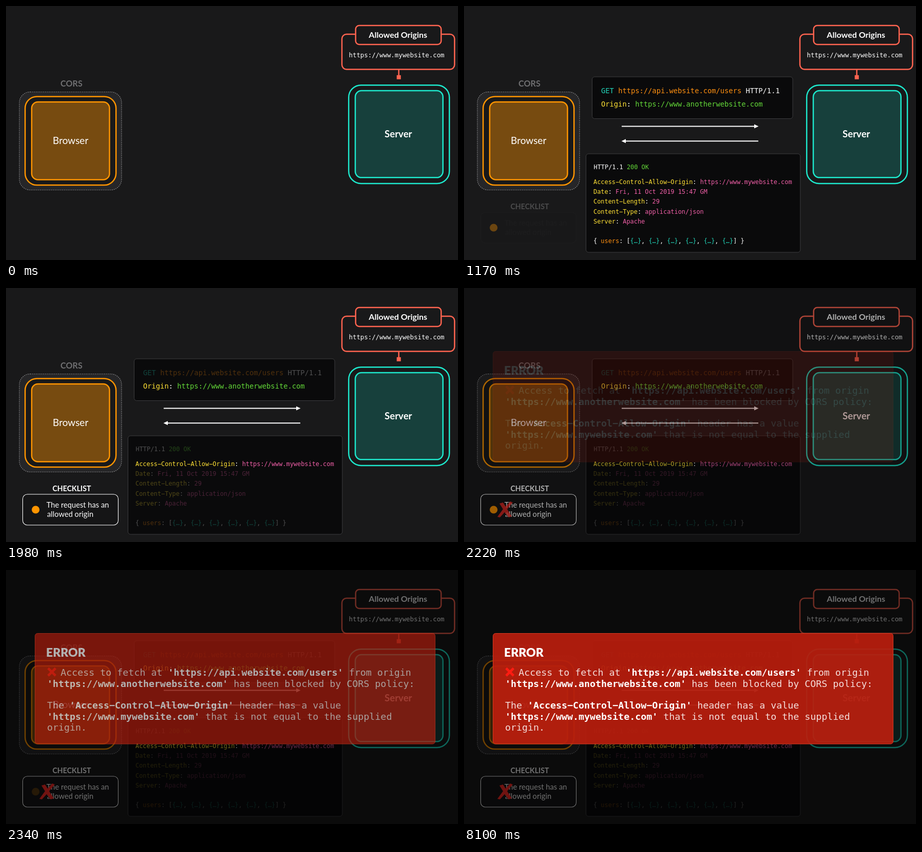
These frames come from a looping animation (880x495 px, 8130 ms). An HTML page:

```html
<!DOCTYPE html>
<html lang="en">
<head>
<meta charset="utf-8">
<title>CORS request blocked</title>
<style>
  html, body { margin: 0; width: 100%; height: 100%; overflow: hidden; background: #19191a; }
  svg { display: block; width: 100vw; height: 100vh; }
  text { white-space: pre; fill: #fff; font-family: Lato, "Open Sans", sans-serif; }
  .mono, .mono text { font-family: "DejaVu Sans Mono", "Noto Sans Mono", monospace; }
  .mid { text-anchor: middle; }
  .bold { font-weight: 700; }
  .card { fill: #0a0a0b; stroke: #3d3d3f; }
  .ring { fill: #19191a; stroke-width: 2.5; }
  .orange { stroke: #ff9500; }
  .teal { stroke: #1de9cd; }
  .coral { stroke: #ff6450; }
  .arrow { stroke: #fff; stroke-width: 2; }
  .t { fill: #22d3b8; }
  .o { fill: #ff9010; }
  .y { fill: #ffe135; }
  .g { fill: #63d838; }
  .p { fill: #ef5fa7; }
  #request text { font-size: 13.76px; }
  #response text { font-size: 11.9px; }
  #panel .mono text { font-size: 18.3px; fill: #f4dedb; }
  #panel .bold { fill: #fff; }
</style>
</head>
<body>
<svg viewBox="0 0 880 495" preserveAspectRatio="none">
  <rect width="880" height="495" fill="#19191a"/>

  <g id="browser">
    <text class="mid bold" x="127.5" y="156.5" font-size="16.2" style="fill:#6e6e70">CORS</text>
    <rect x="26" y="167.5" width="199" height="191" rx="21" fill="#262628" stroke="#858587" stroke-width="1.2" stroke-dasharray="2 1.6"/>
    <rect class="ring orange" x="37.2" y="176.5" width="177" height="172.5" rx="23"/>
    <rect class="ring orange" x="50" y="187" width="151.5" height="151.5" rx="12" style="fill:#774b10"/>
    <text class="mid" x="125.7" y="269" font-size="19">Browser</text>
  </g>

  <g id="server">
    <rect class="ring coral" x="654" y="55" width="219.3" height="68.5" rx="9"/>
    <rect class="ring coral" x="680.7" y="38" width="166.5" height="37" rx="7"/>
    <text class="mid bold" x="763.2" y="61.5" font-size="16">Allowed Origins</text>
    <text class="mono" x="667.5" y="100.3" font-size="12.36">https://www.mywebsite.com</text>
    <path class="coral" d="M764.7 123V137" stroke-width="2.5"/>
    <rect x="760.7" y="134.8" width="8" height="8" fill="#ff6450"/>
    <rect class="ring teal" x="667.2" y="154.2" width="196" height="191.8" rx="24"/>
    <rect class="ring teal" x="680" y="165" width="170.7" height="169.3" rx="12" style="fill:#17403c"/>
    <text class="mid bold" x="763.8" y="256" font-size="18.6">Server</text>
  </g>

  <g id="request" class="mono">
    <rect class="card" x="249.5" y="138" width="390.5" height="81.5" rx="5"/>
    <g class="fading">
      <text x="267" y="170.3"><tspan class="t">GET</tspan> <tspan class="o">https://api.website.com/users</tspan> HTTP/1.1</text>
    </g>
    <text x="267" y="196.3"><tspan class="y">Origin</tspan>: <tspan class="g">https://www.anotherwebsite.com</tspan></text>
    <path class="arrow" d="M307 234.5H567"/>
    <path d="M573.5 234.5l-8.5-4v8z" fill="#fff"/>
  </g>

  <g id="response" class="mono">
    <path class="arrow" d="M313 263.2H573"/>
    <path d="M306.5 263.2l8.5-4v8z" fill="#fff"/>
    <rect class="card" x="237.5" y="288" width="417.3" height="192" rx="5"/>
    <text x="252" y="346.8"><tspan class="y">Access−Control−Allow−Origin</tspan>: <tspan class="p">https://www.mywebsite.com</tspan></text>
    <g class="fading">
      <text x="252.5" y="318.3">HTTP/1.1 <tspan class="g">200 OK</tspan></text>
      <text x="252" y="365.8"><tspan class="y">Date</tspan>: <tspan class="p">Fri, 11 Oct 2019 15:47 GM</tspan></text>
      <text x="252" y="385"><tspan class="y">Content−Length</tspan>: <tspan class="p">29</tspan></text>
      <text x="252" y="404.5"><tspan class="y">Content−Type</tspan>: <tspan class="p">application/json</tspan></text>
      <text x="252" y="423.5"><tspan class="y">Server</tspan>: <tspan class="p">Apache</tspan></text>
      <text id="body" x="252" y="461.7"></text>
    </g>
  </g>

  <g id="checklist">
    <text id="heading" class="mid bold" x="128" y="395.8" font-size="14.2">CHECKLIST</text>
    <g id="item">
      <rect x="32.5" y="402" width="186" height="60" rx="9" fill="#151516" stroke="#fff" stroke-width="1.1"/>
      <text x="78.7" y="428" font-size="14.7">The request has an</text>
      <text x="80" y="446.3" font-size="14.7">allowed origin</text>
    </g>
    <circle id="dot" cx="57.7" cy="432" r="7.6" fill="#ff9500"/>
    <path id="cross" d="M95 418L84 431L93 445L87 447L79 437L70 447L65 446L76 431L69 420L76 418L81 426L90 416Z" fill="#ff2c26"/>
  </g>

  <rect id="shade" width="880" height="495"/>

  <g id="panel">
    <rect x="56.5" y="123.5" width="779" height="215.5" rx="5" fill="#be1e0e" fill-opacity=".9" stroke="#d63a22"/>
    <text x="78" y="168.7" font-size="23" font-weight="900">ERROR</text>
    <path d="M82 191.5L96.5 206M96.5 191.5L82 206" stroke="#ff1c12" stroke-width="4.6"/>
    <g class="mono">
      <text x="106.3" y="206.3">Access to fetch at <tspan class="bold">'https://api.website.com/users'</tspan> from origin</text>
      <text x="80" y="227.7"><tspan class="bold">'https://www.anotherwebsite.com'</tspan> has been blocked by CORS policy:</text>
      <text x="80" y="270.3">The <tspan class="bold">'Access−Control−Allow−Origin'</tspan> header has a value</text>
      <text x="80" y="291.7"><tspan class="bold">'https://www.mywebsite.com'</tspan> that is not equal to the supplied</text>
      <text x="80" y="313">origin.</text>
    </g>
  </g>
</svg>
<script>
  const LOOP = 8130;
  const STEP = 30;
  const el = id => document.getElementById(id);
  const show = (id, opacity) => el(id).setAttribute('opacity', opacity);
  const fading = document.querySelectorAll('.fading');

  const users = Array(6).fill('<tspan class="t">{…}</tspan>').join(', ');
  el('body').innerHTML = `{ <tspan class="o">users</tspan>: [${users}] }`;

  // Smooth 0 to 1 ramp between two times
  function ramp(t, start, end) {
    const p = Math.min(1, Math.max(0, (t - start) / (end - start)));
    return p * p * (3 - 2 * p);
  }

  function draw(time) {
    const t = Math.floor(time % LOOP / STEP) * STEP;

    show('request', ramp(t, 90, 360));
    show('response', ramp(t, 810, 1110));
    show('heading', ramp(t, 1080, 1380));
    show('item', ramp(t, 1140, 1650));
    show('dot', ramp(t, 1060, 1330) * (1 - ramp(t, 2170, 2430)));

    const dimmed = 1 - 0.72 * ramp(t, 1650, 1980);
    fading.forEach(node => node.setAttribute('opacity', dimmed));

    show('cross', ramp(t, 2100, 2280));
    show('shade', 0.56 * ramp(t, 2100, 2320));
    show('panel', ramp(t, 2140, 2460));
  }

  const start = performance.now();
  function tick() {
    draw(performance.now() - start);
    requestAnimationFrame(tick);
  }
  tick();
</script>
</body>
</html>
```
